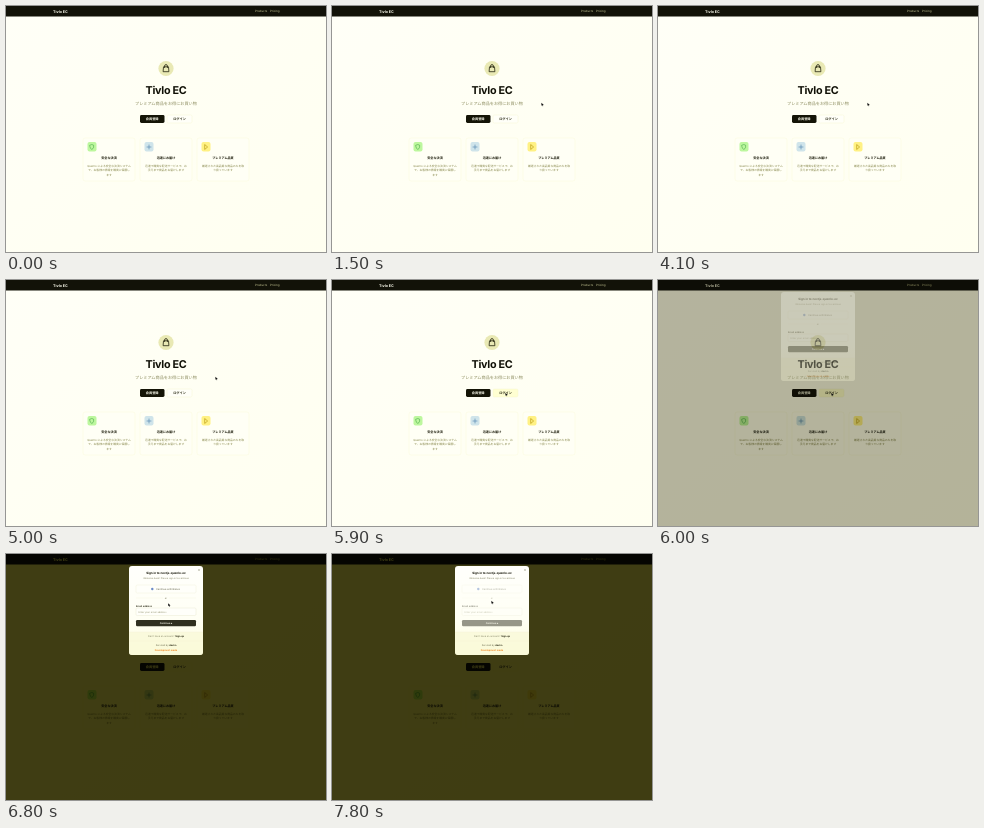
An HTML page that plays this animation: 320x246 px, repeating every 8 s.

```html
<!DOCTYPE html>
<html>
<head>
<meta charset="utf-8">
<title>Tivlo EC</title>
<style>
  html, body { margin: 0; width: 100%; height: 100%; overflow: hidden; background: #fffff5; }
  svg { display: block; width: 100vw; height: 100vh; }
  text { font-family: Inter, "Noto Sans CJK JP", "Noto Sans CJK", sans-serif; text-rendering: geometricPrecision; }
  #dim { mix-blend-mode: multiply; }
</style>
</head>
<body>
<svg viewBox="0 0 320 246" preserveAspectRatio="none">
  <defs>
    <linearGradient id="paper" x2="1" y2="1">
      <stop stop-color="#fffff7"/><stop offset="1" stop-color="#fffff0"/>
    </linearGradient>
    <linearGradient id="panel" x2="0" y2="1">
      <stop stop-color="#fffffc"/><stop offset=".6" stop-color="#fffff4"/><stop offset="1" stop-color="#fcfcdc"/>
    </linearGradient>
  </defs>

  <rect width="320" height="246" fill="url(#paper)"/>
  <rect width="320" height="10.5" fill="#121208"/>
  <g id="page"></g>
  <g fill="none" stroke="#25250f" stroke-width=".8" stroke-linejoin="round">
    <circle cx="160" cy="62.5" r="7.6" fill="#e9e9b4" stroke="none"/>
    <path d="M157.5 60.8h5l.4 4.9h-5.8zM158.6 62v-2a1.4 1.4 0 0 1 2.8 0v2"/>
  </g>
  <g fill="none" stroke-width=".6" stroke-linecap="round" stroke-linejoin="round">
    <path stroke="#48a848" d="M84 139.2l1.8-.7 1.8.7v2q-.3 1.6-1.8 2.2-1.5-.6-1.8-2.2z"/>
    <path stroke="#4c82ac" d="M141 141h4M143 139v4"/>
    <path stroke="#b09000" d="M199 138.8l2.6 2.2-2.6 2.2z"/>
  </g>
  <rect id="dim" width="320" height="246" fill="#3f3d13"/>

  <g id="modal">
    <rect x="123" y="12" width="74" height="89" rx="3" fill="url(#panel)"/>
    <path d="M123 78h74v20a3 3 0 0 1-3 3h-68a3 3 0 0 1-3-3z" fill="#fafad8" opacity=".7"/>
    <path d="M123 78h74M123 87h74" stroke="#ecebcb" stroke-width=".3"/>
    <path d="M192.2 15.2l1.6 1.6m0-1.6l-1.6 1.6" stroke="#77775a" stroke-width=".4"/>
    <g id="form"></g>
    <g id="modalText"></g>
  </g>
  <path id="cursor" d="M-.6-1.2v3l.8-.7.5 1.1.6-.3-.5-1h1z" fill="#111"/>
</svg>
<script>
const $ = id => document.getElementById(id);

function add(parent, tag, attrs, content = '') {
  const el = document.createElementNS('http://www.w3.org/2000/svg', tag);
  for (const [name, value] of Object.entries(attrs)) el.setAttribute(name, value);
  el.textContent = content;
  return $(parent).appendChild(el);
}
const label = (parent, content, x, y, size, fill, weight = 400, anchor = 'middle', spacing = 0) =>
  add(parent, 'text', { x, y, fill, 'font-size': size, 'font-weight': weight,
    'text-anchor': anchor, 'letter-spacing': spacing }, content);
const box = (parent, x, y, width, height, rx, fill, stroke = 'none') =>
  add(parent, 'rect', { x, y, width, height, rx, fill, stroke, 'stroke-width': .35 });

// Landing page
label('page', 'Tivlo EC', 47, 6.6, 3.7, '#fffff0', 700, 'start');
label('page', 'Products', 249, 6.4, 2.9, '#cfcf9c', 400, 'start');
label('page', 'Pricing', 264, 6.4, 2.9, '#cfcf9c', 400, 'start');
label('page', 'Tivlo EC', 160, 88.3, 10.8, '#101006', 700, 'middle', -.3);
label('page', 'プレミアム商品をお得にお買い物', 160, 99.2, 4.15, '#8d8d60');
box('page', 134, 109, 24.5, 8, 1.4, '#141406');
label('page', '会員登録', 146.2, 114.2, 3.2, '#fffff0', 700);
const login = box('page', 161, 109, 25, 8, 1.4, '#fffff8', '#f2f2c8');
label('page', 'ログイン', 173.5, 114.2, 3.2, '#25250f', 600);

const cards = [
  ['#bdf79e', '安全な決済', ['Quenlo による安全な決済システム', 'で、お客様の情報を確実に保護し', 'ます']],
  ['#cfe4ea', '迅速にお届け', ['迅速で確実な配送サービスで、お', '手元まで商品をお届けします']],
  ['#fff184', 'プレミアム品質', ['厳選された高品質な商品のみを取', 'り扱っています']]
];
cards.forEach(([tint, title, lines], i) => {
  const x = 77 + 57 * i;
  box('page', x, 132, 52, 43, 2, '#fffff5', '#fafad2');
  box('page', x + 4.5, 136, 9, 9.5, 2, tint);
  label('page', title, x + 26, 153, 3.1, '#1b1b0a', 700);
  lines.forEach((line, row) => label('page', line, x + 26, 160.7 + row * 4.6, 2.8, '#86864a'));
});

// Sign-in dialog
label('modalText', 'Sign in to nextjs-quenlo-ec', 160, 20.4, 3, '#17170a', 700);
label('modalText', 'Welcome back! Please sign in to continue', 160, 25.2, 2.35, '#88886a');
box('form', 130, 31, 60, 8, 1.2, '#fffffa', '#ececd4');
add('form', 'circle', { cx: 146.3, cy: 35, r: 1.2, fill: '#6c8cc8' });
label('form', 'Continue with Brelvo', 150, 35.9, 2.45, '#66664c', 400, 'start');
add('form', 'path', { d: 'M130 44h27m6 0h27', stroke: '#ececd4', 'stroke-width': .3 });
label('form', 'or', 160, 44.8, 2.4, '#88886a');
label('form', 'Email address', 130, 52.6, 2.4, '#2c2c18', 600, 'start');
box('form', 130, 54, 60, 7.5, 1.2, '#fffffa', '#e2e2c6');
label('form', 'Enter your email address', 132.5, 58.6, 2.4, '#9c9c7c', 400, 'start');
box('form', 130, 66, 60, 6.3, 1.2, '#303020');
label('form', 'Continue ▸', 160, 70, 2.4, '#fffff0', 600);
const signup = label('modalText', 'Don’t have an account? ', 160, 83.4, 2.4, '#88886a');
signup.insertAdjacentHTML('beforeend', '<tspan fill="#25250f" font-weight="700">Sign up</tspan>');
const secured = label('modalText', 'Secured by ', 160, 92.2, 2.4, '#77775a');
secured.insertAdjacentHTML('beforeend', '<tspan fill="#33331c" font-weight="700">dovim</tspan>');
label('modalText', 'Development mode', 160, 97.2, 2.4, '#f08018', 600);

// Pointer stops: time, x, y
const stops = [[0, 210, 98], [5000, 210, 98], [5700, 174, 114], [6300, 174, 114],
  [7000, 160, 35], [7600, 160, 36], [7800, 160, 48], [8000, 160, 48]];

function pointerAt(t) {
  const i = stops.findIndex(stop => stop[0] > t);
  const [t0, x0, y0] = stops[i - 1], [t1, x1, y1] = stops[i];
  const p = (t - t0) / (t1 - t0), ease = p * p * (3 - 2 * p);
  return [x0 + (x1 - x0) * ease, y0 + (y1 - y0) * ease];
}
const progress = (t, start, duration) => Math.min(1, Math.max(0, (t - start) / duration));

function draw(now) {
  const t = now % 8000;
  $('dim').style.opacity = progress(t, 5950, 130);
  $('modal').style.opacity = progress(t, 5950, 170);
  $('form').style.opacity = t < 7200 ? 1 : .5;
  login.setAttribute('fill', t >= 5600 && t < 6500 ? '#ffffd2' : '#fffff8');
  $('cursor').style.opacity = t < 500 ? 0 : 1;
  $('cursor').setAttribute('transform', `translate(${pointerAt(t)})`);
  requestAnimationFrame(draw);
}
draw(performance.now());
</script>
</body>
</html>
```
